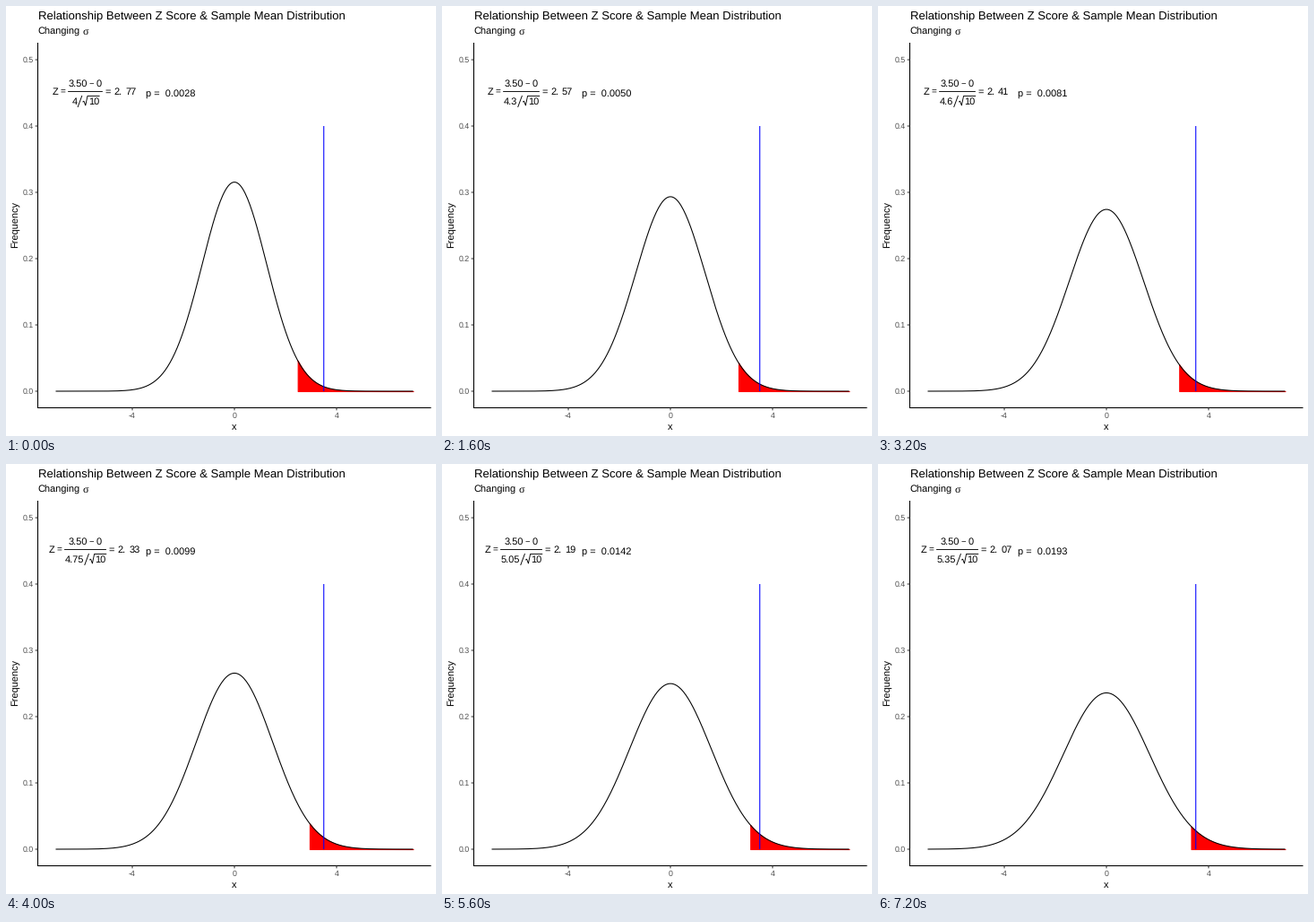
A matplotlib script that plays this animation: 480x480 px, repeating every 8 s.

```python
import math

import matplotlib.pyplot as plt
import numpy as np
from matplotlib.animation import FuncAnimation

SIZE, DPI = 480, 80
FRAMES, INTERVAL = 10, 800
MEAN, N = 3.5, 10
LINE = 1.07
GRAY = "#4d4d4d"

plt.rcParams["font.family"] = "Liberation Sans"
plt.rcParams["text.hinting"] = "none"

fig = plt.figure(figsize=(SIZE / DPI, SIZE / DPI), dpi=DPI, facecolor="white")
ax = fig.add_axes([0, 0, 1, 1])


def pt(px):
    return px * 72 / DPI


def sx(x):
    return 255 + 28.5 * x


def sy(y):
    return 430 - 740 * y


def text(x, y, s, size=11, **kw):
    ax.text(x, y, s, fontsize=pt(size), va="baseline", **kw)


def line(xs, ys, color="black", width=LINE, **kw):
    ax.plot(xs, ys, color=color, lw=pt(width), snap=False,
            solid_capstyle="butt", **kw)


def num_width(s, size=11):
    return size * sum(0.278 if c == "." else 0.556 for c in s)


def draw_axes():
    text(35.5, 15, "Relationship Between Z Score & Sample Mean Distribution", 13.14)
    text(35.5, 32, "Changing")
    text(85.3, 32, "σ", 12, family="Liberation Serif")
    line([35.5, 35.5], [41, 449])
    line([35, 474.5], [448.5, 448.5])
    for k in range(6):
        y = sy(k / 10)
        line([32.7, 35.5], [y, y], "#333333")
        text(30.6, y + 3.2, f"{k / 10:.1f}", 8.8, color=GRAY, ha="right")
    for x in (-4, 0, 4):
        line([sx(x)] * 2, [448.5, 451.3], "#333333")
        text(sx(x), 460.2, str(x), 8.8, color=GRAY, ha="center")
    text(255, 473, "x", ha="center")
    text(12.5, 244, "Frequency", rotation=90, rotation_mode="anchor", ha="center")


def draw_formula(sigma, z):
    label = f"{sigma:.2f}".rstrip("0").rstrip(".")
    w = num_width(label)
    den = w + 25
    bar = max(38.7, den + 0.4)
    left = 98.5 - (17 + bar + 37) / 2
    text(left, 99, "Z")
    text(left + 8.6, 99, "=", 10)

    x0 = left + 17
    mid = x0 + bar / 2
    line([x0, x0 + bar], [95.5, 95.5], width=0.9)
    text(mid - 18.7, 90, "3.50")
    text(mid + 4, 90, "−", 9.5)
    text(mid + 12.5, 90, "0")

    d = mid - den / 2 + 0.5
    text(d, 110, label)
    d += w
    line([d + 0.5, d + 5.3], [113, 100], width=0.9)
    r = d + 6
    line([r, r + 1.4, r + 3.2, r + 5.4, r + 19],
         [107.2, 106.2, 111, 100.5, 100.5], width=0.9)
    text(r + 6.3, 110, "10")

    x1 = x0 + bar
    whole, frac = f"{z:.2f}".split(".")
    text(x1 + 2.8, 99, "=")
    text(x1 + 12.7, 99, whole + ".")
    text(x1 + 25.2, 99, frac)


def draw(i):
    sigma = 4 + 0.15 * i
    se = sigma / math.sqrt(N)
    z = MEAN / se
    p = math.erfc(z / math.sqrt(2)) / 2

    def density(x):
        return np.exp(-((x / se) ** 2) / 2) / (se * math.sqrt(2 * math.pi))

    ax.clear()
    ax.set(xlim=(0, SIZE), ylim=(SIZE, 0))
    ax.axis("off")

    tail = np.linspace(1.96 * se, 7, 150)
    ax.fill_between(sx(tail), sy(0), sy(density(tail)), color="red", lw=pt(LINE))
    xs = np.linspace(-7, 7, 301)
    line(sx(xs), sy(density(xs)))
    line([sx(MEAN)] * 2, [sy(0.4), sy(0)], "blue")

    draw_axes()
    draw_formula(sigma, z)
    text(155.8, 101, f"p =  {p:.4f}")


anim = FuncAnimation(fig, draw, frames=FRAMES, init_func=lambda: draw(0),
                     interval=INTERVAL, repeat=True, repeat_delay=0)
plt.show()
```
